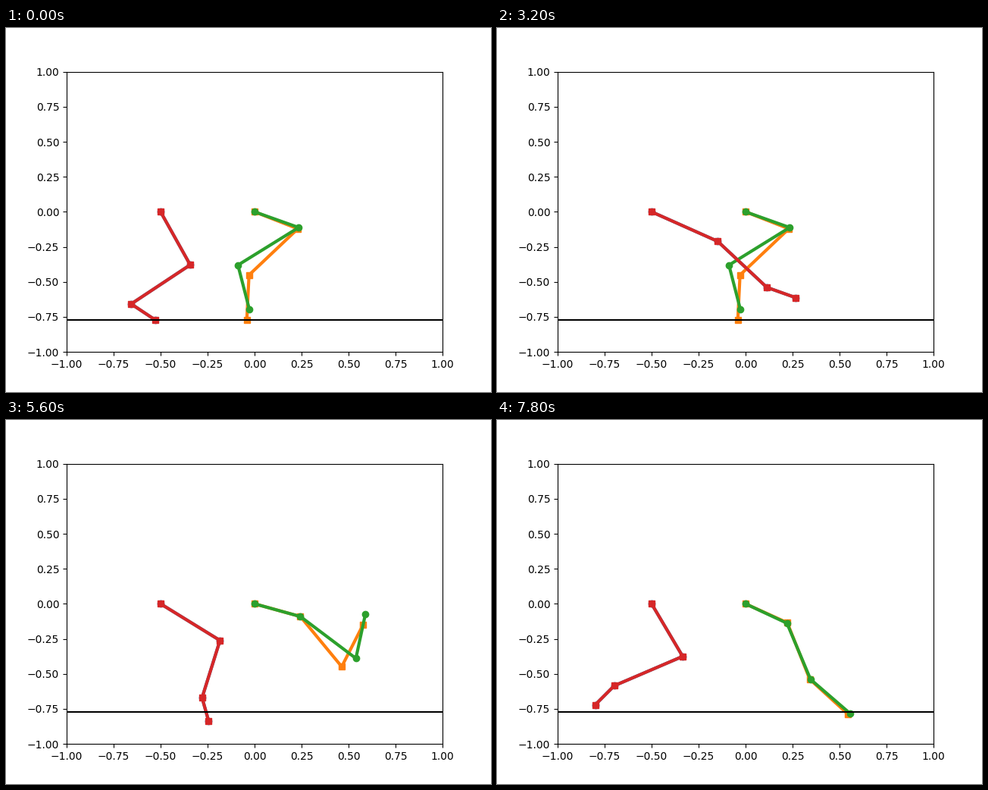
A matplotlib script that plays this animation: 640 by 480 pixels, repeating every 8000 ms.

```python
import numpy as np
import matplotlib.pyplot as plt
from matplotlib.animation import FuncAnimation

STEP = 200      # ms per frame
FRAMES = 40
GROUND = -0.77


class Leg:
    """Three bones passing through a few poses, angles in degrees."""

    def __init__(self, root, bones, times, thigh, shin, fold):
        self.root = root
        self.bones = np.array(bones)
        self.times = times
        self.poses = np.array([thigh, shin, fold]).T   # fold: foot against shin

    def pose(self, t):
        t = np.clip(t, self.times[0], self.times[-1])
        k = min(np.searchsorted(self.times, t, side="right"), len(self.times) - 1)
        u = (t - self.times[k - 1]) / (self.times[k] - self.times[k - 1])
        a, b = self.poses[k - 1], self.poses[k]
        if b[2] > a[2]:
            ease = np.array([1 - (1 - u) ** 1.5] * 2 + [u])   # swinging forward
        else:
            ease = np.array([u, u, u ** 3])                   # foot unfolds late
        return a + (b - a) * ease

    def joints(self, t):
        thigh, shin, fold = self.pose(t)
        angles = np.radians([thigh, shin, shin + fold])
        x = np.cumsum(np.append(0, self.bones * np.cos(angles)))
        y = np.cumsum(np.append(0, self.bones * np.sin(angles)))
        return self.root + x, y


HIND_BONES = (0.41, 0.42, 0.17)
FORE_BONES = (0.26, 0.42, 0.32)
FORE_TIMES = (3700, 4400, 5000, 5600, 6400, 7800)

hind = Leg(-0.5, HIND_BONES, (200, 1600, 3200, 4400, 6400, 7800),
           thigh=(-67.4, -19.9, -30.9, -38.8, -40.1, -66.2),
           shin=(-138.4, 0, -51.5, -68.8, -126, -150.1),
           fold=(96.7, 149.7, 26, 25, 25, 23.4))
plan = Leg(0, FORE_BONES, FORE_TIMES,
           thigh=(-27.7, -20.4, -20.4, -20.4, -22.4, -31.3),
           shin=(-128.2, -136, -12, -58.4, -62.6, -73.5),
           fold=(36.1, 184, 130, 127.6, 40.5, 22.7))
real = Leg(0, FORE_BONES, FORE_TIMES,
           thigh=(-25.5, -28.5, -20.4, -20.4, -22.5, -32.1),
           shin=(-140.3, -12.4, 2, -45.3, -59.5, -72.6),
           fold=(61.2, 172, 128, 126.2, 45.2, 23.4))

fig, ax = plt.subplots(figsize=(6.4, 4.8), dpi=100)
ax.set_xlim(-1, 1)
ax.set_ylim(-1, 1)

legs = [hind, plan, real, hind]
lines = [ax.plot([], [], color=f"C{n}", marker="os"[n % 2], lw=3)[0]
         for n in range(len(legs))]
ax.plot([-1, 1], [GROUND, GROUND], color="black")


def update(i):
    for line, leg in zip(lines, legs):
        line.set_data(*leg.joints(i * STEP))
    return lines


anim = FuncAnimation(fig, update, frames=FRAMES, interval=STEP,
                     init_func=lambda: update(0), repeat=True, blit=False)
plt.show()
```
